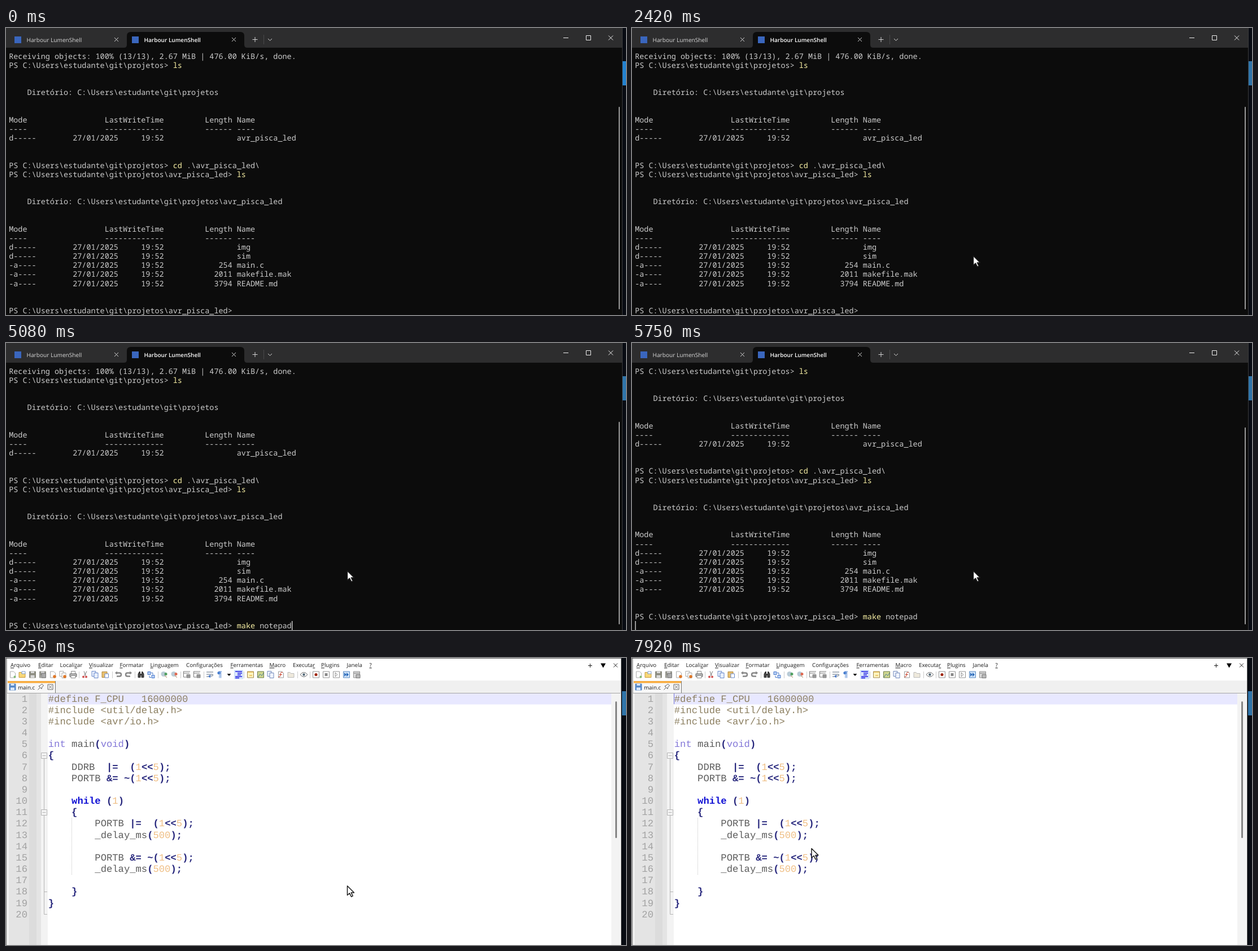
Recreate the animation shown at these times as an HTML page. Size 1098 by 510 pixels, loop 8 s.

```html
<!DOCTYPE html>
<html lang="pt">
<head>
<meta charset="utf-8">
<title>Terminal e editor</title>
<style>
  html, body { margin: 0; width: 100%; height: 100%; overflow: hidden; background: #0c0c0c; }
  svg { display: block; width: 1098px; height: 510px; }
  text { white-space: pre; text-rendering: geometricPrecision; }
  .ui { font-family: "Open Sans", "Noto Sans", sans-serif; font-size: 9.75px; fill: #1c1c1c; }
  .tab { font-size: 10.15px; fill: #d8d8d8; }
  .active { font-weight: 600; fill: #fff; font-size: 10.05px; }
  .mono { font-family: "Noto Sans Mono", "DejaVu Sans Mono", monospace; font-size: 13.467px; fill: #ccc; }
  .cmd { fill: #f9f1a5; }
  .code { font-family: "Liberation Mono", monospace; font-size: 17.2px; fill: #5c5c5c; }
  .num { fill: #a2a2a2; text-anchor: end; }
  .pre { fill: #8c7f60; }
  .type { fill: #8478d8; }
  .key { fill: #1010d4; font-weight: bold; }
  .lit { fill: #efbe84; }
  .op { fill: #26267c; font-weight: bold; }
  .u { text-decoration: underline; }
  .line { fill: none; stroke-width: 1; }
</style>
</head>
<body>
<svg viewBox="0 0 1098 510">
  <path fill="#080b12" d="M0 0H1098V510H0z"/>
  <rect id="sideButton" x="1091" y="59" width="7" height="43"/>

  <g id="terminal">
    <path fill="#0c0c0c" d="M0 0H1091V510H0z"/>
    <g id="lines" class="mono"></g>
    <path fill="#2d2d2e" d="M0 0H1091V35H0z"/>
    <path fill="#0c0c0c" d="M209 35q5 0 5-5V14q0-7 7-7H415q7 0 7 7v16q0 5 5 5z"/>
    <path fill="#3a66bd" d="M15 15h12v12H15zM223 15h12v12H223z"/>
    <text class="ui tab" x="36.5" y="25">Harbour LumenShell</text>
    <text class="ui tab active" x="244.5" y="24.5">Harbour LumenShell</text>
    <path class="line" stroke="#d4d4d4" d="M192 17l7 7m0-7l-7 7M400 17l7 7m0-7l-7 7M436.500 20.500h9m-4.500-4.500v9M464 19l3.500 3.500 3.500-3.500"/>
    <path class="line" stroke="#4a4a4a" d="M456.500 12v17"/>
    <path class="line" stroke="#f0f0f0" d="M987 17.500h9M1027.500 13.500h8v8h-8zM1067 13.500l8 8m0-8l-8 8"/>
    <path class="line" stroke="#3a3a3c" d="M1091.500 0V510"/>
    <rect id="thumb" x="1085" width="2" rx="1" fill="#9a9a9a"/>
    <rect id="caret" y="494" width="1.200" height="16" fill="#f2f2f2"/>
  </g>

  <g id="editor">
    <path fill="#fff" d="M0 0H1089V510H0z"/>
    <path fill="#f0f0f0" d="M2 40H1089V62H2z"/>
    <path fill="#e4e4e4" d="M4 62H62V510H4z"/>
    <path fill="#dcdcdc" d="M41 62H54V510H41z"/>
    <path class="line" stroke="#5c5c5c" d="M0 .500H1090M1 0V510M1089.500 0V510"/>
    <path class="line" stroke="#a4a4a4" d="M2 62.500H1088"/>
    <g id="menu" class="ui"></g>
    <path class="line" stroke="#222" d="M1031 13.500h7m-3.500-3.500v7M1076 9.500l7 7m0-7l-7 7"/>
    <path d="M1053 9.500h9l-4.500 8z"/>
    <g id="tools"></g>
    <g id="tabStrip"></g>
    <g id="blank">
      <path fill="#e8e8ff" d="M62 63H1088V82.500H62z"/>
      <text class="code num" x="37.500" y="77.500">1</text>
      <path class="line" stroke="#5555d0" d="M62 63v19"/>
      <ellipse cx="527.500" cy="29.500" rx="7" ry="5" fill="#929292"/>
    </g>
    <g id="source">
      <path fill="#f3f3f3" d="M62 63H74V510H62zM1072 63H1088V510H1072z"/>
      <path fill="#e8e8ff" d="M74 63H1072V82.500H74z"/>
      <path class="line" stroke="#b4b4b4" d="M67.500 178.500v91M67.500 279.500v176h5.500M67.500 415.500h5.500M62.500 168.500h10v10h-10zM64.500 173.500h6M62.500 269.500h10v10h-10zM64.500 274.500h6"/>
      <path class="line" stroke="#c4c4c4" stroke-dasharray="1 1" d="M116.500 284v102"/>
      <rect x="1079" y="77" width="3" height="243" rx="1.500" fill="#858585"/>
      <path class="line" stroke="#626262" d="M521 29.500q6.500-8 13 0q-6.500 8-13 0z"/>
      <circle cx="527.500" cy="29.500" r="2.200" fill="#536878"/>
      <g id="code" class="code"></g>
      <path id="editCaret" class="line" stroke="#7474d8" d="M74.500 63v19"/>
    </g>
  </g>

  <path id="mouse" fill="#fff" stroke="#1c1c1c" stroke-width="1.500" stroke-linejoin="round" d="M0 0V16.500L4 13l3 6.200 2.700-1.300-2.900-5.900H12z"/>
</svg>

<script>
const $ = id => document.getElementById(id);
const escape = s => s.replace(/&/g, "&amp;").replace(/</g, "&lt;");
const span = (cls, s) => `<tspan class="${cls}">${escape(s)}</tspan>`;
const show = (id, on) => $(id).setAttribute("visibility", on ? "inherit" : "hidden");

// Terminal contents
const CELL = 8.08, ROW = 16.15, LEFT = 5.2;
const root = "C:\\Users\\estudante\\git\\projetos", project = root + "\\avr_pisca_led";
const prompt = (path, cmd = "", args = "") => `PS ${path}> ` + span("cmd", cmd) + args;
const header = "Mode".padEnd(21) + "LastWriteTime" + " ".repeat(9) + "Length Name";
const entry = (mode, size, name) =>
  mode.padEnd(14) + "27/01/2025     19:52" + size.padStart(15) + " " + name;
const listing = (path, ...entries) =>
  ["", "", "    Diretório: " + path, "", "", header, header.replace(/\w/g, "-"), ...entries, "", ""];
const rows = [
  "Receiving objects: 100% (13/13), 2.67 MiB | 476.00 KiB/s, done.",
  prompt(root, "ls"),
  ...listing(root, entry("d-----", "", "avr_pisca_led")),
  prompt(root, "cd", " .\\avr_pisca_led\\"),
  prompt(project, "ls"),
  ...listing(project,
    entry("d-----", "", "img"), entry("d-----", "", "sim"),
    entry("-a----", "254", "main.c"), entry("-a----", "2011", "makefile.mak"),
    entry("-a----", "3794", "README.md")),
  prompt(project)
];
$("lines").innerHTML = rows.map((s, i) =>
  `<text x="${LEFT}" y="${54.8 + i * ROW}">${s}</text>`).join("");
const firstLine = $("lines").firstChild, inputLine = $("lines").lastChild;

// Editor menu: "_" precedes the access key
const menu = { 8: "_Arquivo", 57: "_Editar", 95.5: "Locali_zar", 147: "_Visualizar", 201.5: "_Formatar",
  255.5: "_Linguagem", 319: "Confi_gurações", 397.5: "_Ferramentas", 466.5: "_Macro",
  508: "Executa_r", 558: "_Plugins", 603.5: "_Janela", 643.5: "_?" };
$("menu").innerHTML = Object.entries(menu).map(([x, s]) =>
  `<text x="${x}" y="16.3">${s.replace(/_(.)/, '<tspan class="u">$1</tspan>')}</text>`).join("");

// Toolbar icons, each drawn around its own centre
const path = (d, stroke, fill = "none", width = 1) =>
  `<path d="${d}" stroke="${stroke}" fill="${fill}" stroke-width="${width}"/>`;
const dot = (x, y, r, fill) => `<circle cx="${x}" cy="${y}" r="${r}" fill="${fill}"/>`;
const sheet = (stroke, fill = "#fff") => path("M-4.500-5.500h6l3 3v8h-9z", stroke, fill);
const sheets = (stroke, fill) => path("M-6-6h7v9h-7z", stroke, fill) + path("M-2-3h7v9h-7z", stroke, fill);
const disk = (color, label) => path("M-5.500-5.500h11v11h-11z", color, color) +
  path("M-3-5.500h6v3h-6zM-3.500 1h7v4.500h-7z", "none", label);
const frame = (color, fill = "#fff") => path("M-5.500-5.500h11v11h-11z", color, fill);
const folder = (edge, fill) => path("M-6 5V-4h4l1.500 2H5V5z", edge, fill);
const lens = color => dot(-1, -1, 4.5, "#b9cbd6") + dot(3, -1, 2.5, color) +
  path("M1 2l4 3", "#a07850");
const lock = path("M-6-5.500H6M-5.500-5.500v10h5M-5-2.500h10", "#777") +
  path("M0 0h6v5.500h-6z", "#888", "#999");
const box = inner => frame("#909090") + inner;
const tools = {
  12: sheet("#aaa") + dot(3.5, 4, 2, "#7cb870"),
  29: folder("#c99a3a", "#f8d878") + path("M-1-5.500h6v4h-6z", "#7898c8", "#fff"),
  47: disk("#8c8c80", "#d8d8d8"),
  65: disk("#94948c", "#c8c8c8") + path("M-2-2h7.500v7.500h-7.500z", "#777", "#aaa"),
  83: sheet("#aaa") + dot(3, 3.5, 2.8, "#e07828"),
  101: sheets("#aaa", "#fff") + dot(3, 3.5, 2.8, "#e07828"),
  119: path("M-3.500-6h7v5h-7z", "#888", "#fff") + path("M-6-1.500H6v5h-12z", "#666", "#bbb") + path("M-4 2h8v4h-8z", "#888", "#fff"),
  140: path("M-2-6l3 8M3-6l-4 8", "#777") + dot(-3, 4, 2, "#d05050") + dot(2, 4, 2, "#d05050"),
  158: sheets("#6888c8", "#e8f0ff"),
  176: path("M-6-5h9V5h-9z", "#b08840", "#e8c070") + path("M-1-1.500h6.500v7h-6.500z", "#6888c8", "#fff"),
  199: path("M-5-3H2q3 0 3 3t-3 3H-3", "#888", "none", 2.5) + path("M-2-6l-4 3 4 3z", "none", "#888"),
  217: path("M5-3H-2q-3 0-3 3t3 3H3", "#888", "none", 2.5) + path("M2-6l4 3-4 3z", "none", "#888"),
  239: path("M-5 5v-6l2-4h1.500v4h3v-4H3l2 4v6H1V1h-2v4z", "#333", "#444"),
  257: path("M-6-5h5v5h-5zM1 1h5v5h-5z", "#4878c8", "#b8d0f8") + path("M0-3h3v3M-3 2v3h3", "#4878c8"),
  280: lens("#50a060"),
  298: lens("#e06850"),
  320: lock,
  338: lock,
  361: path("M-6-4.500H6M-6-.500H5q1.500 2.500-1 3H0M-6 3.500h4", "#58687c") + path("M1 0v6l-4-3z", "none", "#4878c8"),
  378: path("M4-5.500H-1M0-5v11M2.500-5v11", "#4a80d0") + dot(-1, -3, 2.6, "#4a80d0"),
  395: path("M-3.500-1.500h7L0 2.500z", "none", "#111"),
  412: path("M-7.500-7.500h15v15h-15z", "#c4dcf8", "#dce8fc") +
    path("M-6-5.500H6M-2-2.500H6M-2 .500H4M-6 3.500H6M-6 6H1", "#1818e0", "none", 1.6),
  433: frame("#a08850", "#fff4c0") + path("M-5-4.500H5M-2 1.500h5", "#d8a020"),
  451: frame("#6b7b48", "#d0d890") + path("M-5 5l4-6 3 3 3-5", "#487898"),
  469: sheets("#7088b8", "#f0f4ff"),
  487: sheet("#999") + path("M3-4q-4-1-4 4t-4 4M-3 0h5", "#c83820"),
  505: folder("#bbb", "#eee9dc"),
  549: box(dot(0, 0, 2.6, "#a02810")),
  567: box(path("M-2.500-2.500h5v5h-5z", "none", "#888")),
  585: box(path("M-2-3.500l4 3.500-4 3.500z", "#888")),
  603: frame("#5888c0", "#d0e4fa") + path("M-4-3.500l4 3.500-4 3.500zM0-3.500l4 3.500-4 3.500z", "none", "#2868b8"),
  621: frame("#909090", "#ddd") + path("M-5-2.500H5M-1 0h7v6h-7z", "#777", "#bbb")
};
const separators = [129.5, 188.5, 228.5, 269.5, 309.5, 350.5, 421.5, 516.5, 538.5];
$("tools").innerHTML =
  path(separators.map(x => `M${x} 24v12`).join(""), "#ccc") +
  Object.entries(tools).map(([x, s]) => `<g transform="translate(${x} 29.5)">${s}</g>`).join("");

const tabHtml = (name, right, pin) => `
  <path fill="#f7f7f7" d="M3 41H${right}V62H3z"/><path fill="#f9ab3c" d="M3 41H${right}v3.500H3z"/>
  <path class="line" stroke="#777" d="M${right + .5} 41v21"/>
  <g transform="translate(11.500 51.500)">${disk("#5688c8", "#dce8f8")}</g>
  <text class="ui" x="21" y="55.500">${name}</text>
  <g transform="translate(${pin} 51.500)">
    ${path("M-5 5l4-4M-3.500-1.500l5 5 .500-3 3-3-3-3-3 3z", "#555")}
    <g transform="translate(17 0)">${path("M-4.500-4.500h9v9h-9zM-2.500-2.500l5 5m0-5l-5 5", "#666")}</g>
  </g>`;

// Source code with simple highlighting
const program = `#define F_CPU   16000000
#include <util/delay.h>
#include <avr/io.h>

int main(void)
{
    DDRB  |=  (1<<5);
    PORTB &= ~(1<<5);

    while (1)
    {
        PORTB |=  (1<<5);
        _delay_ms(500);

        PORTB &= ~(1<<5);
        _delay_ms(500);

    }
}
`.split("\n");
const kinds = [[/^#/, "pre"], [/^(int|void)$/, "type"], [/^while$/, "key"], [/^\d/, "lit"], [/^\W/, "op"], [/./, ""]];
const highlight = s => s.replace(/#.*|\w+|[^\w\s]+/g, t => span(kinds.find(([re]) => re.test(t))[1], t));
$("code").innerHTML = program.map((s, i) => {
  const y = 77.5 + i * 20.17;
  return `<text class="num" x="38" y="${y}">${i + 1}</text><text x="74.8" y="${y}">${highlight(s)}</text>`;
}).join("");

// Timeline in ticks of 1/12 second
const command = "make notepad";
const keyTicks = [36, 38, 39, 40, 41, 50, 52, 53, 55, 58, 59, 61];
const ENTER = 69, OPEN = 73, LOAD = 74;
const within = (n, ...ranges) => ranges.some(([a, b]) => n >= a && n < b);
const mix = (a, b, p) => a + (b - a) * p;
const smooth = p => p * p * (3 - 2 * p);

function mousePosition(n) {
  if (n < 10) {
    const p = smooth((n - 2) / 7);
    return [mix(1086, 571, p), mix(110, 417, p)];
  }
  if (n < 86) {
    const p = Math.min(1, Math.max(0, (n - 10) / 2));
    return [mix(571, 604.5, p), mix(417, 405, p)];
  }
  const p = smooth((n - 86) / 9);
  return [mix(626, 318, p), mix(363, 338.5, p)];
}

let last = -1;
function draw(n) {
  const typed = keyTicks.filter(k => k <= n).length;
  const entered = n >= ENTER, loaded = n >= LOAD;
  show("terminal", n < OPEN);
  show("editor", n >= OPEN);
  show("blank", n >= OPEN && !loaded);
  show("source", loaded);

  const text = command.slice(0, typed);
  inputLine.innerHTML = prompt(project, text.slice(0, 4), text.slice(4));
  $("lines").setAttribute("transform", `translate(0 ${entered ? -ROW : 0})`);
  firstLine.setAttribute("visibility", entered ? "hidden" : "inherit");
  $("thumb").setAttribute("y", entered ? 150 : 140);
  $("thumb").setAttribute("height", entered ? 350 : 360);
  $("caret").setAttribute("x", entered ? 5.5 : LEFT + CELL * (50 + typed));
  show("caret", within(n, [9, 16], [23, 29], [36, 49], [50, OPEN]));

  $("tabStrip").innerHTML = loaded ? tabHtml("main.c", 87, 61.5) : tabHtml("novo 1", 90, 64.5);
  show("editCaret", within(n, [80, 86], [92, 96]));

  $("sideButton").setAttribute("fill", n < 2 ? "#2482cf" : "#3075aa");
  show("mouse", n >= 2);
  $("mouse").setAttribute("transform", `translate(${mousePosition(n)})`);
}

function tick() {
  const n = Math.floor((performance.now() % 8000 + 4) * 12 / 1000) % 96;
  if (n !== last) draw(last = n);
  requestAnimationFrame(tick);
}
tick();
</script>
</body>
</html>
```
